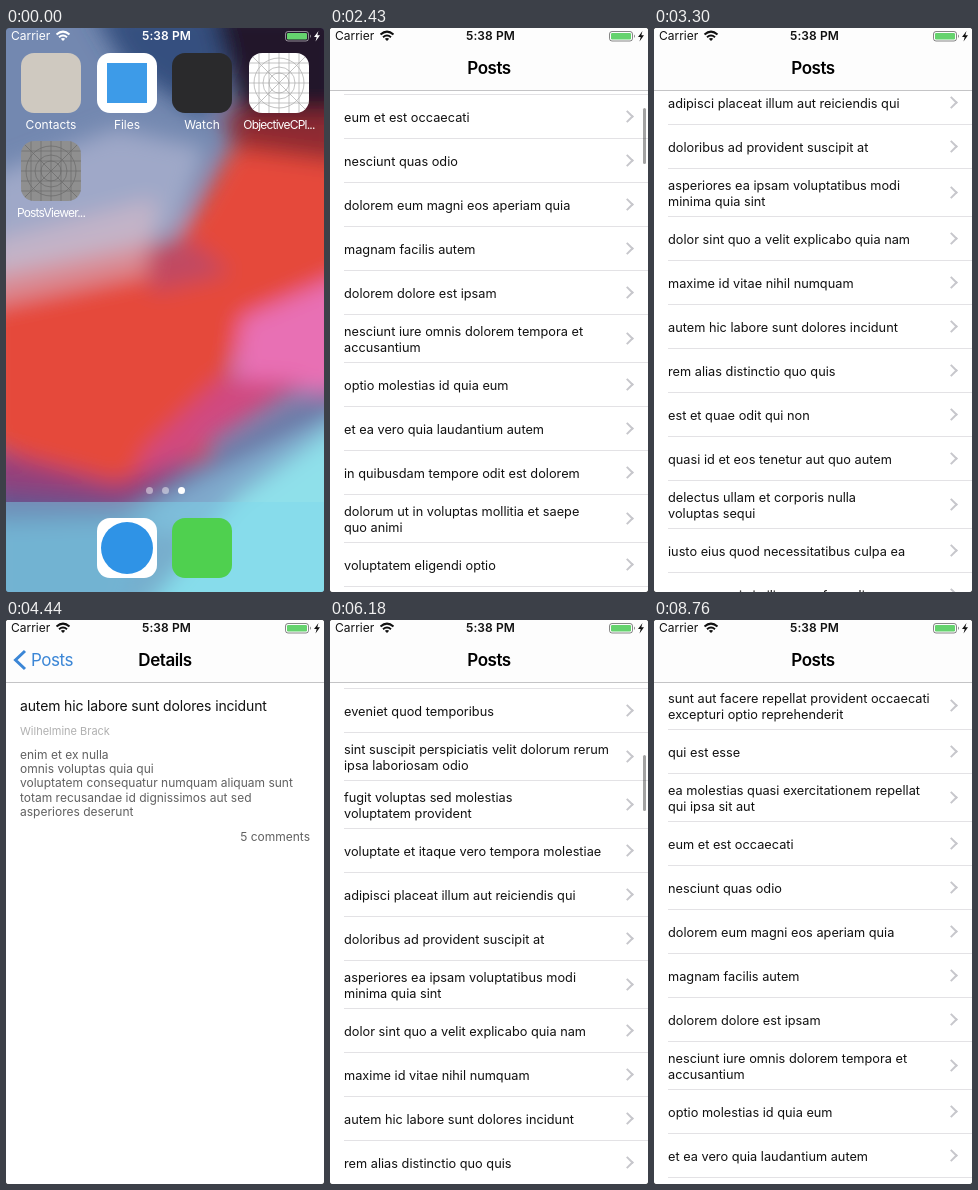
Write an HTML page that moves like this. It is 318x564 px and loops after 8790 ms.

```html
<!DOCTYPE html>
<html lang="en">
<head>
<meta charset="utf-8">
<title>Posts</title>
<style>
*, ::before, ::after { box-sizing: border-box; }
html, body { margin: 0; width: 100%; height: 100%; overflow: hidden; background: #444; }
body { font-family: Inter, sans-serif; color: #111; }
#stage { position: relative; width: 318px; height: 564px; overflow: hidden; border-radius: 3px; background: #000; }
#stage > div, .view, .abs { position: absolute; }
#home, #app, .view { left: 0; top: 0; width: 318px; height: 564px; }
#home { transform-origin: 45px 143px; }
.icon { position: absolute; width: 60px; height: 60px; border-radius: 13px; overflow: hidden; }
.label { position: absolute; width: 90px; text-align: center; color: #fff; font-size: 12px; line-height: 16px; white-space: nowrap; }
.tight { letter-spacing: -.8px; }
#dock { left: 0; top: 474px; width: 318px; height: 90px; background: rgba(125,215,235,.45); }
#splash { background: #fff; }
#app { overflow: hidden; }
.view { background: #fff; overflow: hidden; }
#rows { position: absolute; left: 0; top: 62px; width: 318px; }
.row { position: relative; height: 44px; padding: 1px 0 0 14px; display: flex; align-items: center;
  font-size: 12.75px; line-height: 15.5px; white-space: nowrap; }
.row.tall { height: 48px; }
.row::before { content: ""; position: absolute; left: 14px; right: 0; bottom: 0; height: 1px; background: #e3e2e5; }
.row::after { content: ""; position: absolute; right: 16px; top: 50%; width: 9px; height: 9px; margin-top: -5px;
  border: solid #c7c7cc; border-width: 2px 2px 0 0; transform: rotate(45deg); }
#bar { left: 313px; width: 3px; height: 56px; border-radius: 2px; background: rgba(0,0,0,.36); }
#dim { background: #000; }
#page { box-shadow: 0 0 6px rgba(0,0,0,.2); }
#head { left: 14px; top: 77px; font-size: 14px; letter-spacing: -.15px; line-height: 18px; white-space: nowrap; }
#author { left: 14px; top: 104px; font-size: 11px; line-height: 14px; color: #b0b0b0; }
#body { left: 14px; top: 128px; font-size: 12px; line-height: 14.2px; color: #606060; white-space: pre; }
#count { right: 14px; top: 210px; font-size: 12px; line-height: 14px; color: #606060; }
.spin { position: absolute; left: 149px; top: 272px; }
#nav { position: absolute; left: 0; top: 0; width: 318px; height: 63px; background: #fdfdfd; border-bottom: 1px solid #c4c4c6; }
#nav div { position: absolute; top: 29px; width: 120px; text-align: center; font-size: 17px; line-height: 22px; letter-spacing: -.45px; }
#nav .bold { font-weight: 600; color: #000; }
#back, #arrow { color: #3b86d6; }
#status { left: 0; top: 0; width: 318px; height: 17px; font-size: 12px; line-height: 16px; }
</style>
</head>
<body>
<div id="stage">
  <div id="home">
    <svg id="wall" class="abs" width="318" height="564">
      <filter id="soft" x="-20%" y="-20%" width="140%" height="140%"><feGaussianBlur stdDeviation="11"/></filter>
      <rect width="318" height="564" fill="#7388b0"/>
    </svg>
    <div id="dock" class="abs"></div>
  </div>
  <div id="splash"></div>
  <div id="app">
    <div id="list" class="view"><div id="rows"></div><div id="bar" class="abs"></div></div>
    <div id="dim" class="view"></div>
    <div id="page" class="view">
      <div id="content">
        <div id="head" class="abs"></div><div id="author" class="abs">Wilhelmine Brack</div>
        <div id="body" class="abs"></div><div id="count" class="abs">5 comments</div>
      </div>
    </div>
    <div id="nav">
      <svg id="arrow" class="abs" width="30" height="62"><path d="M19 31L9.5 40L19 49" fill="none" stroke="currentColor" stroke-width="3"/></svg>
      <div id="back">Posts</div><div id="posts" class="bold">Posts</div><div id="details" class="bold">Details</div>
    </div>
  </div>
  <div id="status">
    <span class="abs" style="left:5px">Carrier</span>
    <span class="abs" style="left:136px;font-weight:600;white-space:nowrap;letter-spacing:.1px">5:38 PM</span>
    <svg class="abs" width="318" height="17" fill="none" stroke="currentColor">
      <g stroke-width="2"><path d="M50.5 6.5Q57 .8 63.5 6.5M53 9.2Q57 5.8 61 9.2"/></g>
      <path d="M57 13L54.8 10.8Q57 9.2 59.2 10.8Z" fill="currentColor" stroke="none"/>
      <rect x="279.5" y="3.5" width="23" height="9.5" rx="2.5" stroke-opacity=".5"/>
      <rect x="281" y="5" width="20" height="6.5" rx="1.2" fill="#65d36e" stroke="none"/>
      <path d="M304 6.5q2 1.7 0 3.5z" fill="currentColor" stroke="none" opacity=".5"/>
      <path d="M312.5 3L308 9h2.7L309.5 13.5L314 7.3h-2.7z" fill="currentColor" stroke="none"/>
    </svg>
  </div>
</div>
<script>
const $ = id => document.getElementById(id);
const add = (el, html) => el.insertAdjacentHTML('beforeend', html);
const clamp = x => Math.min(1, Math.max(0, x));

// Home screen
const shades = [
  ['#34507f', '85,-20 235,-20 200,90 120,40'],
  ['#20122a', '205,-20 340,-20 340,120 235,85'],
  ['#9fa8c8', '-20,150 110,100 200,120 170,205 -20,225'],
  ['#c3b4c8', '-20,215 150,170 150,225 -20,255'],
  ['#d98a93', '-20,250 150,215 140,260 -20,285'],
  ['#e5483a', '185,190 225,120 340,125 340,290 230,320 200,430 100,465 -20,415 -20,280 145,245'],
  ['#8f2a30', '215,85 340,85 340,135 230,120'],
  ['#c14a62', '140,218 185,212 225,245 145,265'],
  ['#e86fb4', '235,290 340,245 340,365 225,365'],
  ['#d04a80', '140,420 215,350 300,355 120,465'],
  ['#93407c', '-20,420 110,455 200,425 110,485 -20,465'],
  ['#5f5590', '-20,462 120,475 340,362 340,385 180,485 -20,505'],
  ['#7fa9cc', '340,375 190,450 100,500 200,510 340,410'],
  ['#8fe0ea', '340,392 230,470 130,590 340,590'],
  ['#6a94bd', '-20,495 150,490 120,590 -20,590']
];
add($('wall'), '<g filter="url(#soft)">' + shades.map(([c, p]) => `<polygon fill="${c}" points="${p}"/>`).join('') + '</g>');

let lines = '';
for (let i = 1; i < 6; i++) lines += `M${i * 10} 0V60M0 ${i * 10}H60`;
const grid = `<svg width="60" height="60" fill="none" stroke="#aaa" stroke-width=".7"><path d="${lines}M0 0L60 60M60 0L0 60"/>
  <circle cx="30" cy="30" r="10"/><circle cx="30" cy="30" r="16"/><circle cx="30" cy="30" r="25"/></svg>`;
const shape = (c, s, r) => `<div class="abs" style="left:${30 - s / 2}px;top:${30 - s / 2}px;width:${s}px;height:${s}px;border-radius:${r};background:${c}"></div>`;
const icon = (x, y, color, inner = '', label = '', cls = '') => add($('home'),
  `<div class="icon" style="left:${x}px;top:${y}px;background:${color}">${inner}</div>
   <div class="label ${cls}" style="left:${x - 15}px;top:${y + 64}px">${label}</div>`);
icon(15, 25, '#cfc9c0', '', 'Contacts');
icon(91, 25, '#fff', shape('#3d9be8', 40, '0'), 'Files');
icon(166, 25, '#2a2a2c', '', 'Watch');
icon(243, 25, '#fff', grid, 'ObjectiveCPl...', 'tight');
icon(15, 113, '#8f8f8f', `<div style="filter:brightness(.62)">${grid}</div>`, 'PostsViewer...', 'tight');
icon(91, 490, '#fff', shape('#2f93e6', 52, '50%'));
icon(166, 490, '#4fd04f');
[143, 159, 175].forEach((x, i) => add($('home'),
  `<div class="abs" style="left:${x - 3.5}px;top:458.5px;width:7px;height:7px;border-radius:50%;background:rgba(255,255,255,${i == 2 ? 1 : .45})"></div>`));

// Posts
const titles = `sunt aut facere repellat provident occaecati|excepturi optio reprehenderit
qui est esse
ea molestias quasi exercitationem repellat|qui ipsa sit aut
eum et est occaecati
nesciunt quas odio
dolorem eum magni eos aperiam quia
magnam facilis autem
dolorem dolore est ipsam
nesciunt iure omnis dolorem tempora et|accusantium
optio molestias id quia eum
et ea vero quia laudantium autem
in quibusdam tempore odit est dolorem
dolorum ut in voluptas mollitia et saepe|quo animi
voluptatem eligendi optio
eveniet quod temporibus
sint suscipit perspiciatis velit dolorum rerum|ipsa laboriosam odio
fugit voluptas sed molestias|voluptatem provident
voluptate et itaque vero tempora molestiae
adipisci placeat illum aut reiciendis qui
doloribus ad provident suscipit at
asperiores ea ipsam voluptatibus modi|minima quia sint
dolor sint quo a velit explicabo quia nam
maxime id vitae nihil numquam
autem hic labore sunt dolores incidunt
rem alias distinctio quo quis
est et quae odit qui non
quasi id et eos tenetur aut quo autem
delectus ullam et corporis nulla|voluptas sequi
iusto eius quod necessitatibus culpa ea
a quo magni similique perferendis`.split('\n');
add($('rows'), titles.map(s => `<div class="row${s.includes('|') ? ' tall' : ''}"><span>${s.replace('|', '<br>')}</span></div>`).join(''));
const rows = $('rows').children;

const bodies = {
  23: 'enim et ex nulla\nomnis voluptas quia qui\nvoluptatem consequatur numquam aliquam sunt\ntotam recusandae id dignissimos aut sed\nasperiores deserunt',
  21: 'eos qui et ipsum ipsam suscipit aut\nsed omnis non odio\nexpedita earum mollitia molestiae aut atque rem\nsuscipit\nnam impedit esse'
};

// Activity spinners
let petals = '';
for (let i = 0; i < 12; i++)
  petals += `<path d="M0-5.5V-9" transform="rotate(${-30 * i})" opacity="${Math.max(.25, 1 - i * .13)}"/>`;
for (const id of ['list', 'page'])
  add($(id), `<svg class="spin" width="22" height="22"><g transform="translate(11 11)" stroke="#8a8a8a" stroke-width="1.8" stroke-linecap="round"><g class="turn">${petals}</g></g></svg>`);
const [listSpin, pageSpin] = document.querySelectorAll('.spin');
const turns = document.querySelectorAll('.turn');

const spring = (ms, w = 18.26) => {
  const x = Math.max(0, ms) / 1000 * w;
  const p = 1 - (1 + x) * Math.exp(-x);
  return p > .999 ? 1 : p;
};
const flick = (t, start, span, dist, power) => dist * (1 - (1 - clamp((t - start) / span)) ** power);
const show = (el, on) => el.style.visibility = on ? 'inherit' : 'hidden';
const place = (el, x, alpha) => { el.style.left = x - 60 + 'px'; el.style.opacity = alpha; };

// Two visits: flick the list, open a post, go back
const visits = [
  { end: 5550, flick: [2340, 870, 825, 1.64], fade: [3240, 3300], row: 23, tap: 3450, push: 3540, ready: 4080, press: 4800, pop: 4860, reload: 5220 },
  { end: 8790, flick: [5550, 840, 683, 1.781], fade: [6450, 6570], row: 21, tap: 6750, push: 6860, ready: 7530, press: 8100, pop: 8160, reload: 8520 }
];

function draw(t) {
  // Launch
  const open = spring(t - 15, 15), s = $('splash').style;
  s.left = 15 * (1 - open) + 'px';
  s.top = 113 * (1 - open) + 'px';
  s.width = 60 + 258 * open + 'px';
  s.height = 60 + 504 * open + 'px';
  s.borderRadius = 13 * (1 - open) + 'px';
  s.opacity = clamp(open * 4);
  $('home').style.transform = `scale(${1 + open})`;
  show($('home'), t < 600);
  const fadeIn = clamp((t - 1440) / 300);
  $('app').style.opacity = fadeIn;
  $('status').style.color = t < 1000 ? '#fff' : '#111';
  $('status').style.opacity = t < 1000 ? 1 - open : fadeIn;

  // List
  const v = visits.find(v => t < v.end);
  const back = t >= v.pop;
  const off = back ? 0 : flick(t, ...v.flick);
  const loading = back && t < v.reload;
  $('rows').style.transform = `translateY(${-Math.round(off)}px)`;
  show($('rows'), !loading);
  show(listSpin, loading);
  $('bar').style.top = 65 + off * .1127 + 'px';
  $('bar').style.opacity = t > v.flick[0] ? clamp((v.fade[1] - t) / (v.fade[1] - v.fade[0])) : 0;
  for (const r of rows) r.style.background = '';
  if (t >= v.tap && !back) rows[v.row].style.background = '#d9d9d9';

  // Navigation
  const p = back ? 1 - spring(t - v.pop) : spring(t - v.push);
  $('list').style.transform = `translateX(${-95.4 * p}px)`;
  $('dim').style.opacity = .1 * p;
  $('page').style.transform = `translateX(${318 * (1 - p)}px)`;
  show($('page'), p > 0);
  $('head').textContent = titles[v.row];
  $('body').textContent = bodies[v.row];
  show($('content'), t >= v.ready);
  show(pageSpin, t < v.ready);
  const step = Math.floor((t - 7260) / (1000 / 12)) * 30;
  turns.forEach(g => g.setAttribute('transform', `rotate(${step})`));

  const press = t >= v.press && p > .5 ? .35 : 1;
  place($('posts'), 159 - 113 * p, clamp(1 - 1.6 * p));
  place($('back'), 159 - 113 * p, clamp(1.6 * p - .6) * press);
  place($('details'), 159 + 140 * (1 - p), p);
  $('arrow').style.opacity = p * press;
}

function tick() {
  const t = performance.now() % 8790;
  draw(Math.floor(t / 30) * 30);
  requestAnimationFrame(tick);
}
tick();
</script>
</body>
</html>
```
